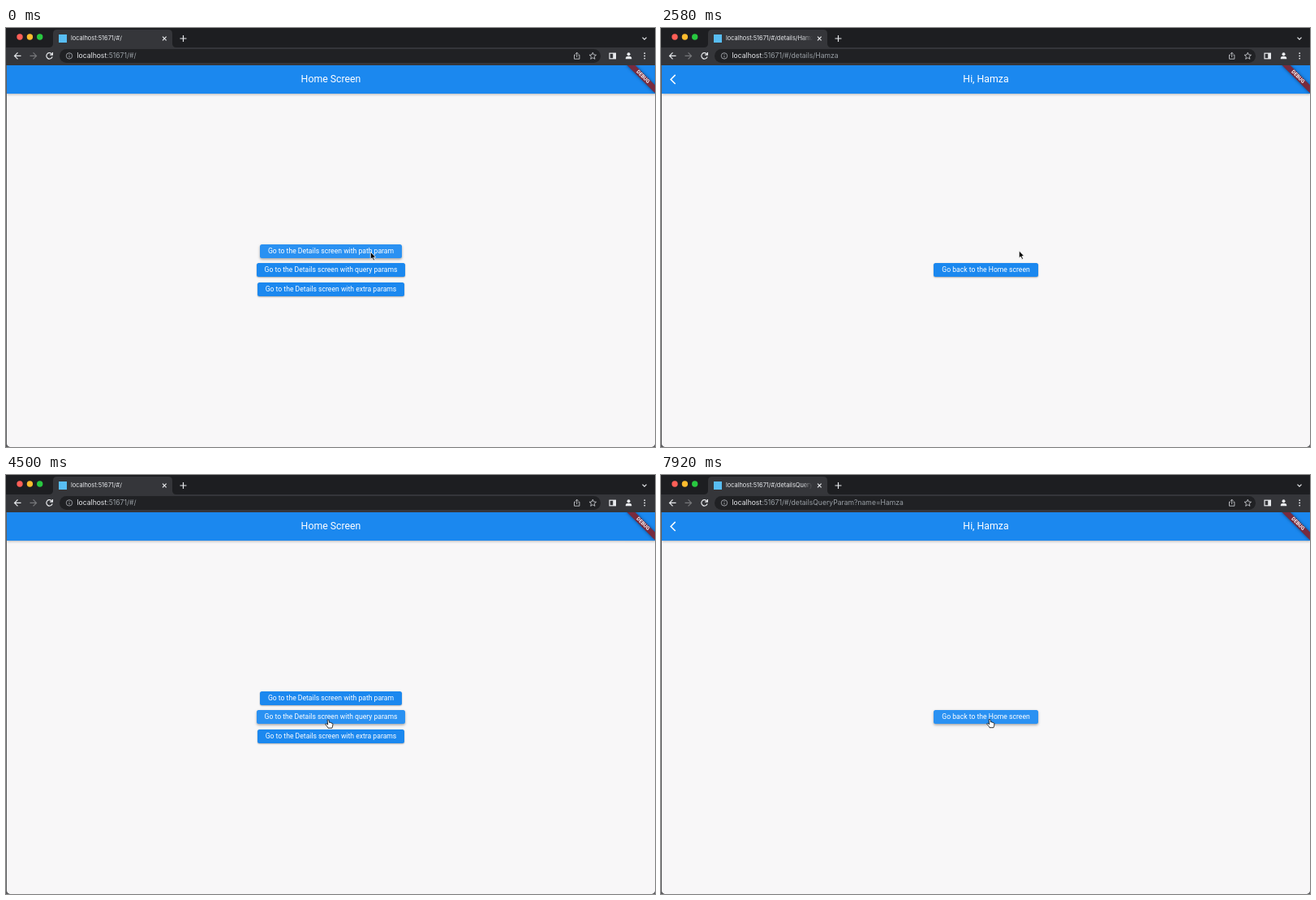
These frames come from a looping animation (800 by 517 pixels, 8000 ms). An HTML page:

```html
<!DOCTYPE html>
<html lang="en">
<head>
<meta charset="utf-8">
<title>Navigation demo</title>
<style>
  html, body { margin: 0; width: 100%; height: 100%; overflow: hidden; background: #5d5d60; }
  #stage { position: relative; width: 800px; height: 517px; overflow: hidden; }
  #chrome, #cursor { position: absolute; left: 0; top: 0; }
  .label { position: absolute; white-space: pre; font-family: Inter, sans-serif; color: #e8eaed; }
  #tab { left: 80px; top: 8px; width: 107px; overflow: hidden; font-size: 7.4px; line-height: 10px;
    -webkit-mask: linear-gradient(90deg, #000 94px, transparent 107px);
    mask: linear-gradient(90deg, #000 94px, transparent 107px); }
  #url { left: 87.5px; top: 28px; font-size: 8.6px; line-height: 12px; }
  #path { color: #9aa0a6; }
  #app { position: absolute; left: 1px; top: 46px; width: 799px; height: 471px; overflow: hidden;
    border-radius: 0 0 5px 5px; background: #f8f7f8; font-family: Roboto, sans-serif; color: #fff; }
  .page { position: absolute; inset: 0; background: #f8f7f8; }
  .bar { position: relative; height: 34.5px; line-height: 34.5px; text-align: center; font-size: 12.3px;
    background: #1b88ef; box-shadow: 0 1px 3px rgba(0,0,0,.28); }
  .bar svg { position: absolute; left: 9.5px; top: 10px; }
  .list { position: absolute; inset: 34.5px 0 0; display: flex; flex-direction: column;
    align-items: center; justify-content: center; gap: 6.15px; }
  .button { height: 17.25px; line-height: 17.25px; padding: 0 9.85px; border-radius: 2.5px;
    font-size: 8.62px; white-space: pre; }
  #edge { position: absolute; right: 100%; top: 0; width: 40px; height: 100%;
    background: linear-gradient(90deg, transparent, rgba(0,0,0,.03)); }
  #banner { position: absolute; left: 774.3px; top: 17.3px; width: 49.4px; height: 7.4px; background: #782b3e;
    box-shadow: 0 0 4px rgba(0,0,0,.5); transform: rotate(45deg); transform-origin: 24.7px -17.3px;
    font-size: 6.3px; font-weight: 700; line-height: 7.4px; text-align: center; }
</style>
</head>
<body>
<div id="stage">
  <svg id="chrome" width="800" height="46" fill="none" stroke="#e8eaed" stroke-width="1.2">
    <g stroke="none">
      <path fill="#1d1e21" d="M0 0H800V25H0z"/>
      <path fill="#35363a" d="M0 24H53q5 0 5-5V7q0-5 5-5H200q5 0 5 5V19q0 5 5 5H800V46H0z"/>
      <rect x="66" y="26" width="667" height="17" rx="8.5" fill="#202124"/>
      <circle cx="17" cy="11" r="3.7" fill="#ff5f57"/>
      <circle cx="29.4" cy="11" r="3.7" fill="#febc2e"/>
      <circle cx="41.7" cy="11" r="3.7" fill="#28c840"/>
      <rect x="65" y="8" width="10" height="10" fill="#58bdf3"/>
    </g>
    <path d="M193 10.7l4.6 4.6m0-4.6l-4.6 4.6M214.5 13h8m-4-4v8"/>
    <path d="M784.5 11.7l2.5 2.5 2.5-2.5"/>
    <path d="M18.5 34.4H10.5m4-4l-4 4 4 4"/>
    <path stroke="#77787b" d="M29.5 34.4h8m-4-4l4 4-4 4"/>
    <path d="M56.7 32.5a3.7 3.7 0 1 0 .4 2.8M57.4 30v3.2h-3.2"/>
    <g stroke="#a5a8ad" stroke-width=".9">
      <circle cx="78" cy="34.4" r="3.7"/>
      <path d="M78 34v2.4M78 32.1v1"/>
    </g>
    <g stroke="#c4c7cb" stroke-width=".9">
      <path d="M702 33.2h-1.5v5h6.4v-5h-1.5M703.7 36v-5.8m-1.7 1.7l1.7-1.7 1.7 1.7"/>
      <path d="M723.3 30.2l1.2 2.8 3 .3-2.3 2 .7 3-2.6-1.6-2.6 1.6.7-3-2.3-2 3-.3z"/>
    </g>
    <rect x="744" y="31.2" width="7.4" height="6.6"/>
    <g stroke="none" fill="#e8eaed">
      <path d="M748.2 31h3.2v7h-3.2z"/>
      <circle cx="767.5" cy="32.3" r="2"/>
      <path d="M763.8 38.2v-1.2c0-3 7.4-3 7.4 0v1.2z"/>
      <circle cx="787.2" cy="31.2" r=".9"/>
      <circle cx="787.2" cy="34.4" r=".9"/>
      <circle cx="787.2" cy="37.6" r=".9"/>
    </g>
  </svg>
  <div id="tab" class="label"></div>
  <div id="url" class="label">localhost<span id="path"></span></div>

  <div id="app">
    <div id="home" class="page">
      <div class="bar">Home Screen</div>
      <div class="list">
        <div class="button">Go to the Details screen with path param</div>
        <div class="button">Go to the Details screen with query params</div>
        <div class="button">Go to the Details screen with extra params</div>
      </div>
    </div>
    <div id="details" class="page">
      <div id="edge"></div>
      <div class="bar">
        <svg width="14.8" height="14.8" viewBox="0 0 24 24"><path fill="#fff" d="M11.67 3.87L9.9 2.1 0 12l9.9 9.9 1.77-1.77L3.54 12z"/></svg>
        Hi, Hamza
      </div>
      <div class="list"><div class="button">Go back to the Home screen</div></div>
    </div>
    <div id="banner">DEBUG</div>
  </div>

  <svg id="cursor" width="20" height="20" overflow="visible" stroke-linejoin="round">
    <path id="arrow" fill="#000" stroke="#fff" stroke-width=".8"
      d="M0 0V9.2L2.1 7.3 3.6 10.7 5.2 10 3.7 6.7H6.5z"/>
    <path id="hand" fill="#fff" stroke="#000" stroke-width=".8"
      d="M-1.2 .4C-1.2-.8 .5-.8 .7 .4L1.2 3.2C1.8 2.6 2.6 2.8 2.8 3.6 3.4 3.1 4.2 3.4 4.3 4.1 5 3.8 5.6 4.3 5.6 5.2L5.3 7.8 4.6 9.9H-.3C-.8 8.3-2.4 7.1-3.5 5.4-3.8 4.5-2.6 4.2-1.9 4.9L-.6 5.8z"/>
  </svg>
</div>
<script>
const LOOP = 8000, SLIDE = 400;
const PUSH1 = 1617, POP = 4080, PUSH2 = 5880;
const $ = id => document.getElementById(id);
const clamp = x => Math.min(1, Math.max(0, x));
const ramp = (t, a, b) => clamp((t - a) / (b - a));
const smooth = x => x * x * (3 - 2 * x);
const within = (t, spans) => spans.some(([a, b]) => t >= a && t < b);

// cubic-bezier(.35, .91, .33, .97)
function easeOut(x) {
  const curve = (s, a, b) => 3 * (1 - s) ** 2 * s * a + 3 * (1 - s) * s * s * b + s ** 3;
  let lo = 0, hi = 1;
  for (let i = 0; i < 20; i++) {
    const mid = (lo + hi) / 2;
    if (curve(mid, .35, .33) < x) lo = mid; else hi = mid;
  }
  return curve(lo, .35, .97 * 0 + .33) && curve(lo, .91, .97);
}
const slide = (t, start) => easeOut(ramp(t, start, start + SLIDE));

const hands = [[80, 1640], [3120, 4110], [4200, 5900], [6040, LOOP]];
const moves = [ // start, end, dx, dy
  [80, 420, -8, -1.5], [2620, 3400, -44, 27.5], [4830, 5500, 8, -.5]
];
const [pathButton, queryButton, extraButton, backButton] = document.querySelectorAll('.button');
const buttons = [ // hover spans, presses as [down, up, x]
  { el: pathButton, hover: [[-500, 1640]], press: [[1500, 2100, 128]] },
  { el: queryButton, hover: [[4250, 6300]], press: [[5740, 6300, 96]] },
  { el: extraButton, hover: [], press: [] },
  { el: backButton, hover: [[3120, 4500], [6120, LOOP + 500]], press: [[3990, 4500, 61]] }
];

function paintButton({ el, hover, press }, t) {
  const h = Math.max(0, ...hover.map(([a, b]) => Math.min(ramp(t, a, a + 120), 1 - ramp(t, b, b + 120))));
  const base = `rgb(${27 + 15 * h},${136 + 9 * h},${239 + 3 * h})`;
  const hit = press.find(([a, b]) => t >= a && t < b);
  if (hit) {
    const r = (t - hit[0]) * .42;
    el.style.background = `radial-gradient(circle at ${hit[2]}px 50%, #2186e6 ${r}px, #1c79d4 ${r + 14}px)`;
  } else el.style.background = base;
  el.style.boxShadow = `0 ${.8 + .6 * h}px ${1.8 + 1.4 * h}px rgba(0,0,0,.35)`;
}

function draw(t) {
  const shown = t < POP ? slide(t, PUSH1) : t < PUSH2 ? 1 - slide(t, POP) : slide(t, PUSH2);
  $('home').style.transform = `translateX(${-800 / 3 * shown}px)`;
  $('details').style.transform = `translateX(${800 * (1 - shown)}px)`;
  $('edge').style.opacity = shown < 1 ? shown : 0;

  const route = t >= PUSH2 ? 'detailsQueryParam?name=Hamza' : t >= PUSH1 && t < POP ? 'details/Hamza' : '';
  $('path').textContent = ':51671/#/' + route;
  $('tab').textContent = 'localhost:51671/#/' + route;

  buttons.forEach(b => paintButton(b, t));

  let x = 449.3, y = 276.3;
  for (const [a, b, dx, dy] of moves) {
    const k = smooth(ramp(t, a, b));
    x += dx * k;
    y += dy * k;
  }
  $('cursor').style.transform = `translate(${x}px,${y}px)`;
  const hand = within(t, hands);
  $('hand').style.display = hand ? '' : 'none';
  $('arrow').style.display = hand ? 'none' : '';
}

function frame() {
  draw(performance.now() % LOOP);
  requestAnimationFrame(frame);
}
frame();
</script>
</body>
</html>
```
